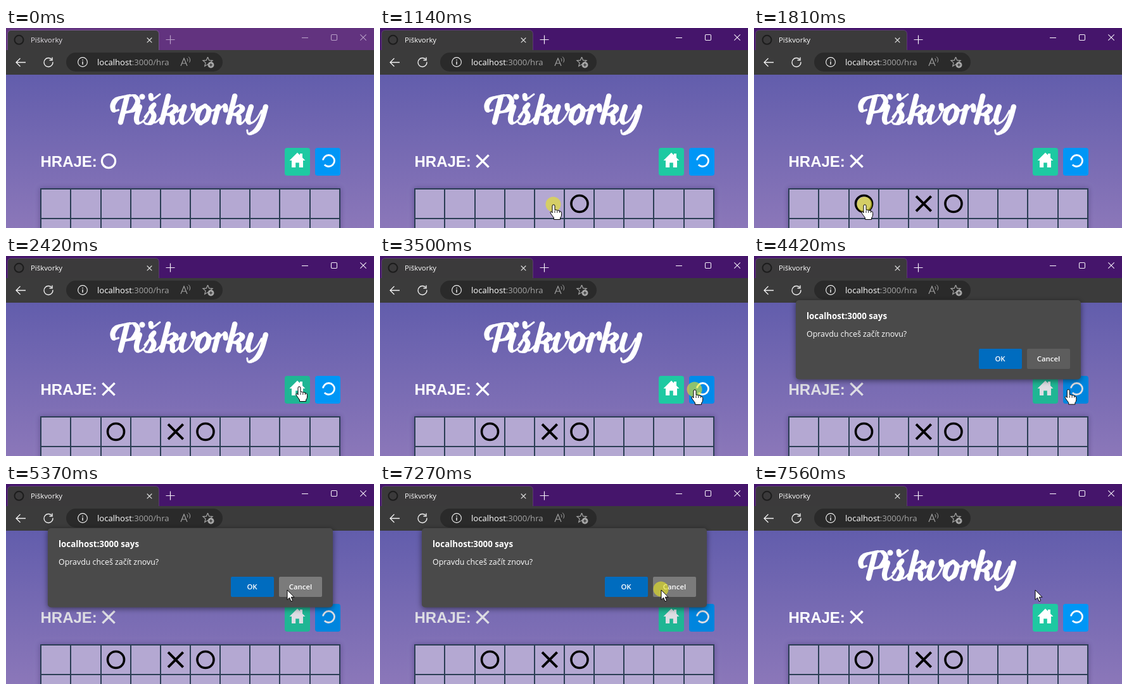
Animation, 581 px wide and 317 px high, one loop 8 s. Source, as an HTML page with a canvas:

```html
<!DOCTYPE html>
<html lang="cs">
<head>
<meta charset="utf-8">
<title>Piškvorky</title>
<style>
html, body { margin: 0; width: 100%; height: 100%; overflow: hidden; background: #6b62ae; }
canvas { display: block; width: 581px; height: 317px; }
</style>
</head>
<body>
<canvas id="stage"></canvas>
<script>
const W = 581, H = 317, LOOP = 8000, TAU = Math.PI * 2;
const UI = '"Open Sans", "Noto Sans", sans-serif';
const canvas = document.getElementById('stage');
const ctx = canvas.getContext('2d');
const dpr = window.devicePixelRatio || 1;
canvas.width = W * dpr;
canvas.height = H * dpr;

const ENTRY = { x: 327, y: 312 };
const LEGS = [
  { from: 390, to: 520, x: 318, y: 281 },
  { from: 800, to: 940, x: 274, y: 281 },
  { from: 1290, to: 1680, x: 175, y: 281, sag: 9 },
  { from: 1960, to: 2420, x: 463, y: 208 },
  { from: 2420, to: 2680, x: 497, y: 213 },
  { from: 4400, to: 4840, x: 388, y: 164 },
  { from: 5040, to: 5370, x: 444, y: 168 }
];
const CLICKS = [690, 1140, 1700, 3500, 7270], PRESS = 125;
const MOVES = [
  { at: 720, col: 5 }, { at: 1210, col: 4 }, { at: 1780, col: 2 }
];
const OPEN = 3640, CLOSE = 7400;
const HOME = [440, 190, 40, 44], AGAIN = [488, 190, 40, 44];
const OK = [355, 147, 68, 32], CANCEL = [431, 147, 68, 32];

const HAND = new Path2D('M-2 12V1a2 2 0 0 1 4 0V7.5q2-1 3.8.6 2.4-.7 3.8 1.2 3 0 3 3V15q0 3-2 5v2.5H.5V20q-2-3-5-7-1.6-2.8.6-3.2 1.2.2 1.9 2.2z');
const ARROW = new Path2D('M0 0V15.5L3.6 12.2 6 18 8.7 16.9 6.3 11.3H11Z');
const HOUSE = new Path2D('M460 197.5L464 201.5V199H468V205.5L472.5 210H469V221H462.8V213.5H457.2V221H451V210H447.5Z');

// Slanted brush: heavy going down, light going up. Points are x, height above the baseline.
function buildTitle() {
  const path = new Path2D();
  const dot = (x, h, r) => {
    const sx = x + .25 * h, sy = 153 - h;
    path.moveTo(sx + r, sy);
    path.arc(sx, sy, r, 0, TAU);
  };
  const mix = (a, b, c, d, u) =>
    b + .5 * u * (c - a + u * (2 * a - 5 * b + 4 * c - d + u * (3 * b - a - 3 * c + d)));
  const brush = (...p) => {
    const n = p.length / 2;
    const at = (i, k) => p[Math.max(0, Math.min(n - 1, i)) * 2 + k];
    const point = (i, u) => [0, 1].map(k => mix(at(i - 1, k), at(i, k), at(i + 1, k), at(i + 2, k), u));
    for (let i = 0; i < n - 1; i++) {
      for (let u = 0; u < 1; u += .03) {
        const [x, h] = point(i, u), [x2, h2] = point(i, u + .02);
        const down = Math.max(0, h - h2) / (Math.hypot(x2 - x, h2 - h) || 1);
        dot(x, h, 1.5 + 2.7 * down);
      }
    }
  };
  const stem = (x, h) => brush(x, h, x, 3.5);
  const cup = x => brush(x, 28, x - .5, 10, x + 5, 2, x + 13, 8, x + 18, 22);
  const ring = (x, rx, ry) => [-1, 1].forEach(s =>
    brush(x, 16 + ry, x + s * rx, 16 + ry / 2, x + s * rx, 16 - ry / 2, x, 16 - ry));
  const k = x => {
    stem(x, 45);
    brush(x + 1, 14, x + 4, 26, x + 11, 30, x + 17, 25, x + 12, 18, x + 4, 16);
    brush(x + 6, 16, x + 14, 13, x + 17, 4, x + 22, 2, x + 28, 12);
  };

  stem(180, 43);
  brush(184, 46, 166, 41, 161, 31, 165, 22, 172, 23);
  brush(184, 46, 192, 45, 199, 36, 195, 23, 183, 19);
  cup(204);
  dot(204, 44, 4.6);
  brush(216, 12, 226, 31, 223, 24, 230, 14, 228, 3, 221, 1, 216, 5);
  brush(229, 4, 236, 4, 244, 14);
  brush(217, 46, 221, 40, 231, 48);
  k(245);
  brush(266, 20, 275, 29);
  cup(274.5);
  brush(292, 20, 288, 30, 291, 24, 299, 24);
  ring(307, 7.5, 14);
  brush(312, 25, 320, 22, 327, 27);
  stem(328, 28);
  brush(328, 15, 333, 27, 338, 30, 341, 23);
  k(350);
  cup(380);
  brush(403, 28, 402, 5, 397, -9, 387, -15, 383, -9);
  return path;
}
const TITLE = buildTitle();

const ramp = (t, a, b) => Math.max(0, Math.min(1, (t - a) / (b - a)));
const over = (p, [x, y, w, h]) => !!p && p.x >= x && p.x <= x + w && p.y >= y && p.y <= y + h;
const gridX = i => 55.25 + 47.15 * i;

function cursorAt(t) {
  if (t < LEGS[0].from) return null;
  let { x, y } = ENTRY;
  for (const leg of LEGS) {
    const u = ramp(t, leg.from, leg.to), e = u * u * (3 - 2 * u);
    x += (leg.x - x) * e;
    y += (leg.y - y) * e + (leg.sag || 0) * Math.sin(Math.PI * u);
  }
  return { x, y };
}

function box(x, y, w, h, r, fill) {
  ctx.beginPath();
  ctx.roundRect(x, y, w, h, r);
  ctx.fillStyle = fill;
  ctx.fill();
}

function line(color, width, ...runs) {
  ctx.beginPath();
  for (const r of runs) {
    for (let i = 0; i < r.length; i += 2) ctx[i ? 'lineTo' : 'moveTo'](r[i], r[i + 1]);
  }
  ctx.strokeStyle = color;
  ctx.lineWidth = width;
  ctx.stroke();
}

function arc(x, y, r, color, width, from = 0, to = TAU) {
  ctx.beginPath();
  ctx.arc(x, y, r, from, to);
  ctx.strokeStyle = color;
  ctx.lineWidth = width;
  ctx.stroke();
}

function disc(x, y, r, fill) {
  ctx.beginPath();
  ctx.arc(x, y, r, 0, TAU);
  ctx.fillStyle = fill;
  ctx.fill();
}

function cross(x, y, r, color, width) {
  line(color, width, [x - r, y - r, x + r, y + r], [x + r, y - r, x - r, y + r]);
}

function plus(x, y, r, color, width) {
  line(color, width, [x - r, y, x + r, y], [x, y - r, x, y + r]);
}

function text(str, x, y, font, color) {
  ctx.font = font;
  ctx.fillStyle = color;
  ctx.fillText(str, x, y);
  return x + ctx.measureText(str).width;
}

function drawTabs(active) {
  const ink = active ? '#f4eef8' : '#b99fc8';
  box(0, 0, W, 35, 0, active ? '#45156b' : '#62337f');
  box(2, 3, 240, 32, [6, 6, 0, 0], active ? '#5b3b72' : '#75558a');
  box(3, 4, 238, 32, [5, 5, 0, 0], '#3b3a3b');
  arc(20.5, 18.8, 7, '#1c1c1c', 2);
  text('Piškvorky', 39, 23, '11.4px ' + UI, active ? '#fff' : '#e4e0e6');
  cross(226.5, 19.3, 3.8, '#dcdcdc', 1.2);
  plus(259.5, 18.5, 7, ink, 1.2);
  line(ink, 1.1, [467, 15.5, 477, 15.5]);
  ctx.beginPath();
  ctx.roundRect(513.5, 10.5, 9, 9, 1.5);
  ctx.stroke();
  cross(564, 15, 4.7, ink, 1.1);
}

function drawToolbar() {
  const ink = '#f2f2f2', dim = '#a4a4a4', pill = '#2a2a2a';
  box(0, 35, W, 39, 0, '#3b3b3b');
  line(ink, 1.3, [31, 54.5, 16, 54.5], [22.5, 48, 16, 54.5, 22.5, 61]);
  arc(67, 54.5, 7, ink, 1.4, -.1, 5.5);
  line(ink, 1.4, [73, 46.5, 73, 51, 68.5, 51]);

  box(95, 39, 247, 30, 15, pill);
  arc(121, 54, 7.4, ink, 1.1);
  line(ink, 1.4, [121, 53, 121, 58], [121, 50, 121, 51.5]);
  const x = text('localhost', 144, 59, '13.1px ' + UI, '#fff');
  text(':3000/hra', x, 59, '13.1px ' + UI, dim);

  line(dim, 1.2, [276, 60, 281, 48, 286, 60], [278, 56, 284, 56]);
  for (const r of [4, 7.5]) arc(283, 51, r, dim, 1, -.8, .5);
  const star = [];
  for (let i = 0; i <= 10; i++) {
    const r = i % 2 ? 3.6 : 8, a = (i / 10 - .25) * TAU;
    star.push(318.5 + r * Math.cos(a), 54 + r * Math.sin(a));
  }
  line(dim, 1.2, star);
  disc(323.5, 58.5, 5, dim);
  plus(323.5, 58.5, 2.5, pill, 1.1);
}

function drawButtons(p, modal, ink) {
  box(...HOME, 4, modal || over(p, HOME) ? '#1fb694' : '#1ec9a2');
  ctx.fillStyle = ink;
  ctx.fill(HOUSE);
  box(...AGAIN, 4, modal ? '#0085de' : over(p, AGAIN) ? '#008bea' : '#0096f6');
  arc(509.5, 210.5, 9, ink, 2.8, -Math.PI, 2.4);
  ctx.beginPath();
  ctx.moveTo(495.5, 209.5);
  ctx.lineTo(506, 209.5);
  ctx.lineTo(500.7, 215.5);
  ctx.fill();
}

function drawBoard(done) {
  ctx.save();
  ctx.shadowColor = 'rgba(50,40,95,.45)';
  ctx.shadowBlur = 8 * dpr;
  box(54, 254, 474, 80, 0, '#b4a8d2');
  ctx.restore();
  for (let i = 0; i <= 10; i++) {
    const x = Math.round(gridX(i));
    line('#2b3e54', 2, [x, 254, x, H]);
  }
  for (const y of [255, 302]) line('#2b3e54', 2, [54, y, 528, y]);
  done.forEach((m, i) => {
    const x = gridX(m.col + .5) + .4;
    if (i % 2) cross(x, 278.5, 11.8, '#000', 4);
    else arc(x, 278.5, 13, '#000', 3.6);
  });
}

function drawPage(t, p, modal) {
  const sky = ctx.createLinearGradient(0, 74, 0, H);
  sky.addColorStop(0, '#625dac');
  sky.addColorStop(1, '#8b77b9');
  ctx.fillStyle = sky;
  ctx.fillRect(0, 74, W, H - 74);
  ctx.fillStyle = '#fff';
  ctx.fill(TITLE);

  const ink = modal ? '#dedee4' : '#fff';
  const done = MOVES.filter(m => t >= m.at);
  text('HRAJE:', 54.5, 220, 'bold 24px "Liberation Sans", Arial, sans-serif', ink);
  if (done.length % 2) cross(162, 211, 9.6, ink, 3.4);
  else arc(162, 211, 10.6, ink, 3.2);
  drawButtons(p, modal, ink);
  drawBoard(done);
}

function drawDialog(p, alpha) {
  ctx.save();
  ctx.globalAlpha = alpha;
  ctx.save();
  ctx.shadowColor = 'rgba(0,0,0,.5)';
  ctx.shadowBlur = 10 * dpr;
  ctx.shadowOffsetY = 2 * dpr;
  box(66, 70, 450, 125.5, 5, '#4a4a4a');
  ctx.restore();
  text('localhost:3000 says', 83, 100, 'bold 13.3px ' + UI, '#fff');
  text('Opravdu chceš začít znovu?', 83, 128, '12.4px ' + UI, '#fff');
  box(...OK, 2, over(p, OK) ? '#1a78c4' : '#006cbf');
  box(...CANCEL, 2, over(p, CANCEL) ? '#7b7b7b' : '#5d5d5d');
  ctx.textAlign = 'center';
  text('OK', 388.5, 167, '600 11.4px ' + UI, '#fff');
  text('Cancel', 465, 167, '600 11.4px ' + UI, '#fff');
  ctx.restore();
}

function drawCursor(t, p, modal) {
  if (CLICKS.some(c => t >= c && t < c + PRESS)) disc(p.x - .5, p.y - 1.5, 12, 'rgba(235,232,30,.6)');
  const link = p.y >= 254 || over(p, HOME) || over(p, AGAIN);
  const hand = link && (!modal || t < 4480);
  const shape = hand ? HAND : ARROW;
  ctx.save();
  ctx.translate(p.x, p.y);
  ctx.fillStyle = '#fff';
  ctx.strokeStyle = '#000';
  ctx.lineWidth = 1;
  ctx.lineJoin = 'round';
  ctx.fill(shape);
  ctx.stroke(shape);
  if (hand) for (const x of [2, 5.8, 9.4]) line('#000', .9, [x, 8.5, x, 12]);
  ctx.restore();
}

function draw(t) {
  ctx.setTransform(dpr, 0, 0, dpr, 0, 0);
  const p = cursorAt(t);
  const modal = t >= OPEN && t < CLOSE;
  drawPage(t, p, modal);
  drawTabs(t >= MOVES[0].at);
  drawToolbar();
  if (modal) drawDialog(p, Math.min(ramp(t, OPEN, OPEN + 120), 1 - ramp(t, CLOSE - 40, CLOSE)));
  if (p) drawCursor(t, p, modal);
}

const start = performance.now();
function tick() {
  draw((performance.now() - start) % LOOP);
  requestAnimationFrame(tick);
}
tick();
</script>
</body>
</html>
```
